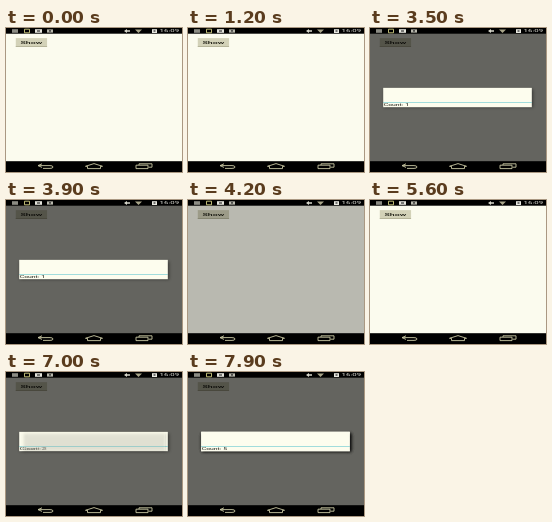
Write an HTML page with a canvas that moves like this. It is 176 by 144 pixels and loops after 8000 ms.

```html
<!DOCTYPE html>
<html lang="en">
<head>
<meta charset="utf-8">
<title>Delayed dialogs</title>
<style>
  html, body { margin: 0; width: 100%; height: 100%; overflow: hidden; background: #000; }
  canvas { display: block; }
</style>
</head>
<body>
<canvas id="stage" width="176" height="144"></canvas>
<script>
const ctx = document.getElementById('stage').getContext('2d');
const LOOP = 8000, STEP = 100, DIM = 0.6;

// The interface is laid out on a 360 x 640 phone screen and fitted to the stage.
const SX = 176 / 360, SY = 144 / 640;

const presses = [[1100, 1200], [4500, 4700], [4800, 5000], [5200, 5300], [5500, 5600]];
const dialogs = [
  { count: 1, start: 3190, end: 3900 },
  { count: 2, start: 6640 },
  { count: 3, start: 6940 },
  { count: 4, start: 7240 },
  { count: 5, start: 7540 }
];

const progress = (t, start, length) => Math.min(1, Math.max(0, (t - start) / length));
const easeOut = p => 1 - (1 - p) ** 2;

function rect(color, x, y, w, h) {
  ctx.fillStyle = color;
  ctx.fillRect(x, y, w, h);
}

function label(text, x, y, size, color, align = 'left', weight = 400) {
  ctx.font = `${weight} ${size}px Roboto, sans-serif`;
  ctx.textAlign = align;
  ctx.textBaseline = 'middle';
  ctx.fillStyle = color;
  ctx.fillText(text, x, y);
}

function shape(path, stroke, fill) {
  const p = new Path2D(path);
  if (fill) { ctx.fillStyle = fill; ctx.fill(p); }
  if (stroke) { ctx.strokeStyle = stroke; ctx.lineWidth = 0.9; ctx.stroke(p); }
}

function onPhone(draw) {
  ctx.save();
  ctx.scale(SX, SY);
  draw();
  ctx.restore();
}

function drawButton(pressed) {
  rect(pressed ? '#aaa994' : '#d3d2b8', 20, 45, 64, 39);
  rect(pressed ? '#8c8b78' : '#b3b197', 20, 80, 64, 4);
  label('Show', 52, 65, 18, '#15150c', 'center', 500);
}

function drawDialog({ count, start, end = Infinity }, t) {
  const alpha = progress(t, start, 120) * (1 - progress(t, end, 200));
  if (!alpha) return;
  const scale = 0.9 + 0.1 * easeOut(progress(t, start, 150)) - 0.1 * progress(t, end, 200);
  ctx.save();
  ctx.globalAlpha = alpha;
  ctx.translate(179, 309);
  ctx.scale(scale, scale);
  ctx.translate(-179, -309);
  ctx.save();
  ctx.shadowColor = 'rgba(0, 0, 0, 0.45)';
  ctx.shadowBlur = 3;
  ctx.shadowOffsetX = ctx.shadowOffsetY = 0.8;
  rect('#fdfdee', 27, 266, 304, 86);
  ctx.restore();
  rect('#33b5c5', 27, 330, 304, 2);
  label(`Count: ${count}`, 28, 343, 14, '#1c1c14');
  ctx.restore();
}

function dimAt(t) {
  if (t < 6000) return DIM * progress(t, 3190, 300) * (1 - progress(t, 3900, 400) ** 2);
  return DIM * progress(t, 6640, 300);
}

function drawStatusBar() {
  rect('#000', 0, 0, 176, 5.7);
  rect('#8c8c84', 6, 1.2, 6, 3.6);
  shape('M18.5 1.2h5v3.6h-5z', '#d2cf83');
  rect('#e4e4dc', 29, 1.2, 7, 3.6);
  rect('#333', 31, 2.4, 3, 1.2);
  rect('#b9b9ae', 41, 1.4, 6, 3.2);
  rect('#333', 43, 2.2, 2, 1.4);
  shape('M118 3l3-2v1.2h3v1.6h-3v1.2z', null, '#d8d8cc');
  shape('M129 1.6h7l-3.5 3.4z', null, '#a9a68a');
  rect('#e8e8e0', 146, 1.2, 5, 3.8);
  rect('#555', 147.5, 2.2, 2, 1.6);
  onPhone(() => label('16:09', 354, 13.5, 16, '#e8e8e0', 'right'));
}

function drawNavBar() {
  const line = '#cbc9a4';
  rect('#000', 0, 133.2, 176, 10.8);
  shape('M36 135.8L32 137.6L36 139.4M32 137.6H44Q47 137.6 47 139Q47 140.4 44 140.4H37', line);
  shape('M79.5 138.3L88 135.6L96.5 138.3H94.5V140.6H81.5V138.3Z', line);
  shape('M130 137.2H142V140.6H130ZM133 137V135.8H146V139.2H142.5', line);
}

function render(now) {
  const t = Math.floor(now % LOOP / STEP) * STEP;
  rect('#fbfbee', 0, 0, 176, 144);
  onPhone(() => drawButton(presses.some(([down, up]) => t >= down && t < up)));
  rect(`rgba(0, 0, 0, ${dimAt(t)})`, 0, 0, 176, 144);
  onPhone(() => dialogs.forEach(dialog => drawDialog(dialog, t)));
  drawStatusBar();
  drawNavBar();
}

const origin = performance.now();
function tick() {
  render(performance.now() - origin);
  requestAnimationFrame(tick);
}
tick();
</script>
</body>
</html>
```
